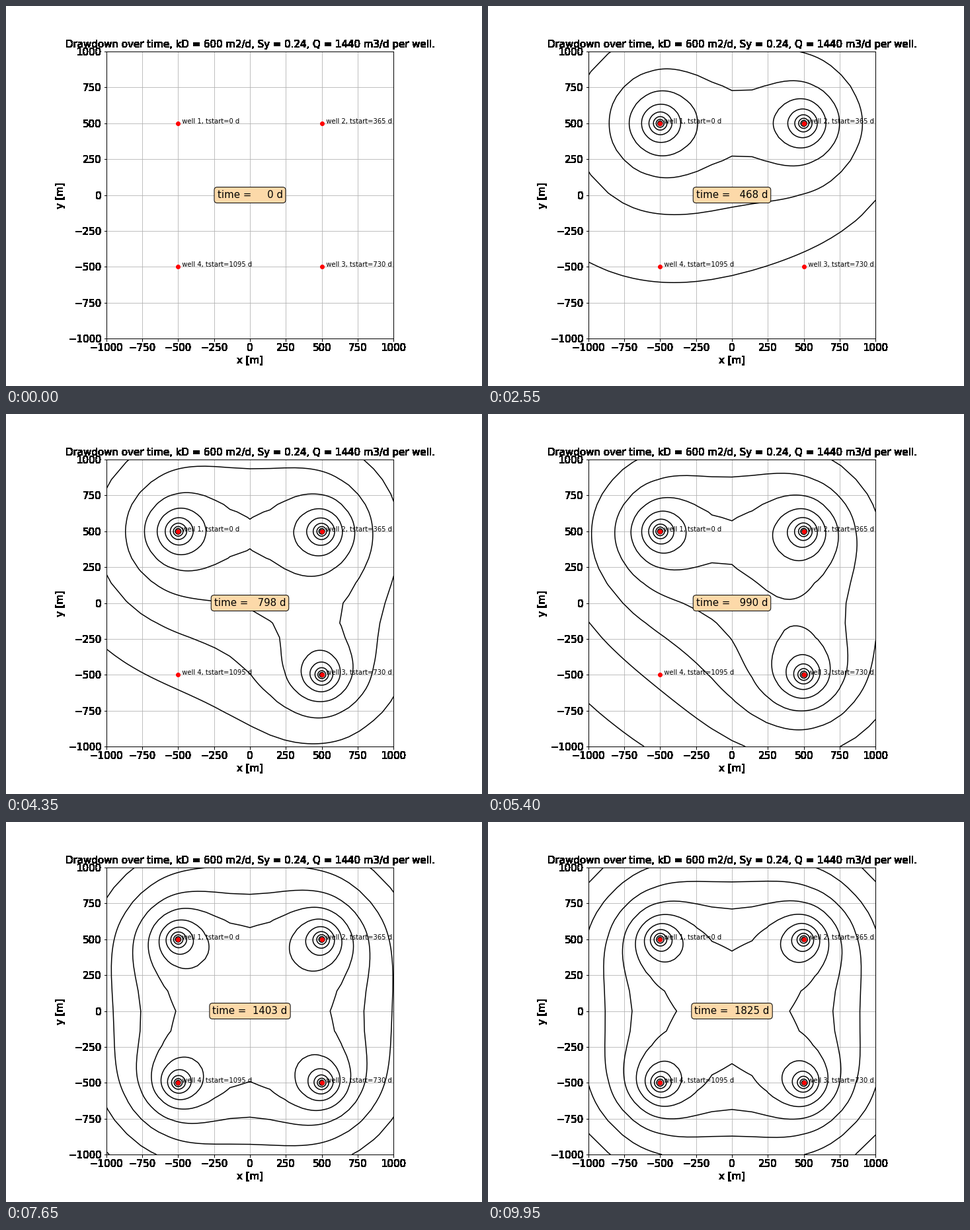
Recreate the animation shown at these times as a matplotlib script. Size 720 by 576 pixels, loop 10 s.

```python
import numpy as np
import matplotlib.pyplot as plt
from matplotlib.animation import FuncAnimation

W, H, DPI = 720, 576, 72
FRAMES, INTERVAL = 200, 50

KD, SY, Q = 600, 0.24, 1440
T_END = 1825
WELLS = [(-500, 500, 0), (500, 500, 365), (500, -500, 730), (-500, -500, 1095)]
LEVELS = np.arange(1, 25) * 0.2

plt.rcParams.update({
    "font.family": "DejaVu Sans",
    "axes.titlesize": 15, "axes.labelsize": 15,
    "xtick.labelsize": 15, "ytick.labelsize": 15,
})


def theis(u):
    """Well function E1(u): power series below 1, rational fit above."""
    u = np.maximum(u, 1e-12)
    low = np.minimum(u, 1)
    small = np.polyval([0.00107857, -0.00976004, 0.05519968, -0.24991055,
                        0.99999193, -0.57721566], low) - np.log(low)
    high = np.clip(u, 1, 600)
    top = np.polyval([1, 8.5733287401, 18.0590169730, 8.6347608925,
                      0.2677737343], high)
    bottom = np.polyval([1, 9.5733223454, 25.6329561486, 21.0996530827,
                         3.9584969228], high)
    return np.where(u <= 1, small, np.exp(-high) / high * top / bottom)


# Grid lines get denser logarithmically towards each well
steps = np.logspace(0, np.log10(500), 20)
around = np.concatenate([-steps[::-1], [0], steps])
axis_pts = np.unique(np.round(np.concatenate([around - 500, around + 500]), 6))
X, Y = np.meshgrid(axis_pts, axis_pts)
DIST2 = [(X - x) ** 2 + (Y - y) ** 2 for x, y, _ in WELLS]


def drawdown(t):
    s = np.zeros_like(X)
    for r2, (_, _, start) in zip(DIST2, WELLS):
        if t > start:
            s += Q / (4 * np.pi * KD) * theis(r2 * SY / (4 * KD * (t - start)))
    return s


def harden(img, dpi):
    """Turn every touched pixel solid black, without soft edges."""
    img = np.array(img, dtype=float)
    img[..., 3] = img[..., 3] > 0
    img[..., :3] = 0
    return img, 0, 0


fig = plt.figure(figsize=(W / DPI, H / DPI), dpi=DPI, facecolor="white")
side = 0.755 * H
rect = [(369 - side / 2) / W, 0.125, side / W, 0.755]
ticks = np.arange(-1000, 1001, 250)


def make_axes(**kw):
    axes = fig.add_axes(rect, **kw)
    axes.set(xlim=(-1000, 1000), ylim=(-1000, 1000), xticks=ticks, yticks=ticks)
    axes.set_autoscale_on(False)
    return axes


ax = make_axes(label="map")
ax.tick_params(length=0, labelbottom=False, labelleft=False)
ax.grid(True, color="#b0b0b0", lw=0.8)

border = make_axes(label="border", zorder=1)
border.patch.set_visible(False)
border.set(xlabel="x [m]", ylabel="y [m]",
           title=f"Drawdown over time, kD = {KD} m2/d, Sy = {SY}, "
                 f"Q = {Q} m3/d per well.")
border.set_agg_filter(harden)

for n, (x, y, start) in enumerate(WELLS, 1):
    ax.plot(x, y, "ro", ms=6, zorder=2.2)
    ax.text(x, y, f"  well {n}, tstart={start} d", fontsize=10)

clock = ax.text(0, 0, "", fontsize=15, ha="center", va="center", zorder=4,
                bbox=dict(boxstyle="round", fc="#fcd9a9", ec="black"))

contours = []


def update(i):
    while contours:
        contours.pop().remove()
    t = T_END * i / (FRAMES - 1)
    clock.set_text(f"time = {t:5.0f} d")
    s = drawdown(t)
    if s.max() > LEVELS[0]:
        contours.append(ax.contour(X, Y, s, levels=LEVELS, colors="black",
                                   linewidths=1.5, zorder=2))
    return []


anim = FuncAnimation(fig, update, frames=FRAMES, interval=INTERVAL,
                     init_func=lambda: update(0), repeat=True, repeat_delay=0)
plt.show()
```
